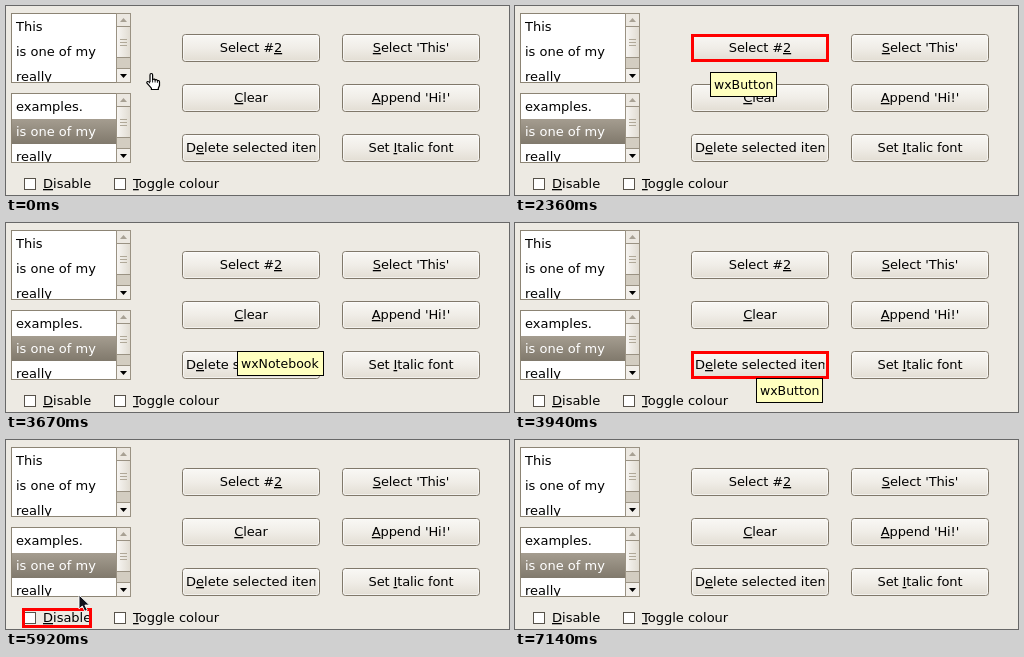
An HTML page that plays this animation: 503 px wide and 189 px high, repeating every 7990 ms.

```html
<!DOCTYPE html>
<html>
<head>
<meta charset="utf-8">
<style>
html, body { margin: 0; height: 100%; overflow: hidden; background: #edeae3; }
svg { display: block; }
text { font: 13px "DejaVu Sans", Verdana, sans-serif; fill: #000; white-space: pre; }
tspan { text-decoration: underline; }
.button text { letter-spacing: -.12px; }
.tip text { font-size: 12.5px; }
</style>
</head>
<body>
<svg id="stage" width="503" height="189" viewBox="0 0 503 189">
  <defs>
    <linearGradient id="face" x2="0" y2="1">
      <stop stop-color="#f9f8f5"/><stop offset=".5" stop-color="#f0ede7"/><stop offset="1" stop-color="#e2ddd3"/>
    </linearGradient>
    <linearGradient id="thumb"><stop stop-color="#f8f6f3"/><stop offset="1" stop-color="#e0dbd1"/></linearGradient>
    <linearGradient id="row" x2="0" y2="1"><stop stop-color="#a59d90"/><stop offset="1" stop-color="#80796c"/></linearGradient>
    <clipPath id="listClip"><rect x="1" y="1" width="104" height="68"/></clipPath>
  </defs>
  <g id="form"></g>
  <g id="overlay"></g>
</svg>
<script>
const form = document.getElementById('form');
const overlay = document.getElementById('overlay');

const rect = (x, y, w, h, attrs) => `<rect x="${x}" y="${y}" width="${w}" height="${h}" ${attrs}/>`;
const text = (x, y, label, attrs = '') =>
  `<text x="${x}" y="${y}" ${attrs}>${label.replace(/_(.)/, '<tspan>$1</tspan>')}</text>`;
const group = (x, y, body, attrs = '') => `<g transform="translate(${x} ${y})" ${attrs}>${body}</g>`;

function button(x, y, label, wide) {
  const caption = wide
    ? `<svg width="133.5" height="28">${text(4, 18, label, 'style="letter-spacing:0"')}</svg>`
    : text(69, 18, label, 'text-anchor="middle"');
  return group(x, y,
    rect(.5, .5, 137, 27, 'rx="3" fill="url(#face)" stroke="#80786a"') +
    rect(1.5, 1.5, 135, 25, 'rx="2" fill="none" stroke="#fff" stroke-opacity=".6"') + caption, 'class="button"');
}

function listBox(y, lines, selected) {
  const rows = lines.map((line, i) =>
    (i === selected ? rect(1, 26, 104, 25, 'fill="url(#row)"') : '') +
    text(5, 18 + 25 * i, line, i === selected ? 'style="fill:#fff"' : '')).join('');
  const grip = [26, 29, 32].map(g => `<path d="M109 ${g}.5h7" stroke="#b0a898"/>`).join('');
  return group(5, y,
    rect(.5, .5, 105, 69, 'fill="#fff" stroke="#8c8474"') +
    `<g clip-path="url(#listClip)">${rows}</g>` +
    rect(105.5, .5, 14, 69, 'fill="#d3cdc1" stroke="#9a9283"') +
    rect(105.5, .5, 14, 13, 'fill="#ece8e1" stroke="#9a9283"') +
    rect(105.5, 13.5, 14, 31, 'fill="url(#thumb)" stroke="#9a9283"') + grip +
    rect(105.5, 55.5, 14, 14, 'fill="#f2efea" stroke="#9a9283"') +
    '<path d="M109 9h7l-3.5-4z" fill="#a8a194"/><path d="M109 61h7l-3.5 4z"/>');
}

const checkBox = (x, label) =>
  rect(x + .5, 172.5, 11, 11, 'fill="#fff" stroke="#57524a"') + text(x + 19, 182, label);

form.innerHTML =
  listBox(7, ['This', 'is one of my', 'really']) +
  listBox(87, ['examples.', 'is one of my', 'really'], 1) +
  button(176, 28, 'Select #_2') + button(336, 28, "_Select 'This'") +
  button(176, 78, '_Clear') + button(336, 78, "_Append 'Hi!'") +
  button(176, 128, 'D_elete selected item', true) + button(336, 128, 'Set _Italic font') +
  checkBox(18, '_Disable') + checkBox(108, '_Toggle colour');

const frames = {
  select: [176, 28, 138, 28], clear: [176, 78, 138, 28], remove: [176, 128, 138, 28],
  toggle: [106, 168, 107, 19], disable: [16, 168, 70, 20], list: [6, 88, 119, 69]
};
const tipWidths = { wxButton: 67, wxNotebook: 87, wxListBox: 72 };

const outline = name => {
  const [x, y, w, h] = frames[name];
  return rect(x + 1.5, y + 1.5, w - 3, h - 3, 'fill="none" stroke="#f00" stroke-width="3"');
};
const tip = (x, y, label) => group(x, y,
  rect(.5, .5, tipWidths[label] - 1, 24, 'fill="#ffffbf" stroke="#000"') + text(4, 17, label), 'class="tip"');
const btn = (x, y) => tip(x, y, 'wxButton');
const book = (x, y) => tip(x, y, 'wxNotebook');
const list = (x, y) => tip(x, y, 'wxListBox');
const arrow = (x, y) => group(x, y,
  '<path d="M1 1v14l3.3-3 2.5 5.3 2.5-1.2-2.4-5h4.6z" fill="#10121c" stroke="#fff" stroke-width=".9"/>');
const hand = (x, y) => group(x, y,
  '<path d="M4 9V2q0-1.5 1.3-1.5T6.6 2v4.5q2-1 2.6.4 1.8-.7 2.3.7 2-.4 2 1.4v3.5l-1.2 2.7v1.3H5.4v-1.3L1 10.2q-.6-1.3.6-1.7 1.2-.2 2.4 1.7" fill="#fff" stroke="#000" stroke-width="1.2"/>' +
  '<path d="M6.6 6.5v3M9.1 7v2.5M11.4 7.8v2" stroke="#000" stroke-width=".9"/>');

// Each step: start time in ms, then what lies over the form.
const steps = [
  [0, hand(140, 67)],
  [830, book(146, 84)],
  [1670, ''],
  [1820, book(161, 69)],
  [1940, book(168, 54)],
  [2090, outline('select')],
  [2210, outline('select') + btn(184, 46)],
  [2360, outline('select') + btn(195, 66)],
  [2970, book(206, 80)],
  [3120, outline('clear') + btn(222, 102)],
  [3270, outline('clear') + btn(224, 108)],
  [3550, book(227, 115)],
  [3670, book(231, 128)],
  [3820, outline('remove')],
  [3940, outline('remove') + btn(241, 155)],
  [4340, outline('remove') + btn(220, 161)],
  [4490, book(176, 174)],
  [4630, outline('toggle') + arrow(170, 175)],
  [4790, outline('toggle') + arrow(169, 179)],
  [5090, outline('toggle')],
  [5240, ''],
  [5360, arrow(87, 177)],
  [5510, outline('disable')],
  [5920, outline('disable') + arrow(72, 154)],
  [6070, ''],
  [6190, outline('list')],
  [6310, outline('list') + list(71, 140)],
  [6990, outline('list') + list(70, 145)],
  [7140, '']
];

const LOOP = 7990;
let shown;
function draw(now) {
  const t = now % LOOP;
  const step = steps.findLast(s => s[0] <= t);
  if (step !== shown) overlay.innerHTML = (shown = step)[1];
}
const start = performance.now();
draw(0);
requestAnimationFrame(function tick() {
  draw(performance.now() - start);
  requestAnimationFrame(tick);
});
</script>
</body>
</html>
```
